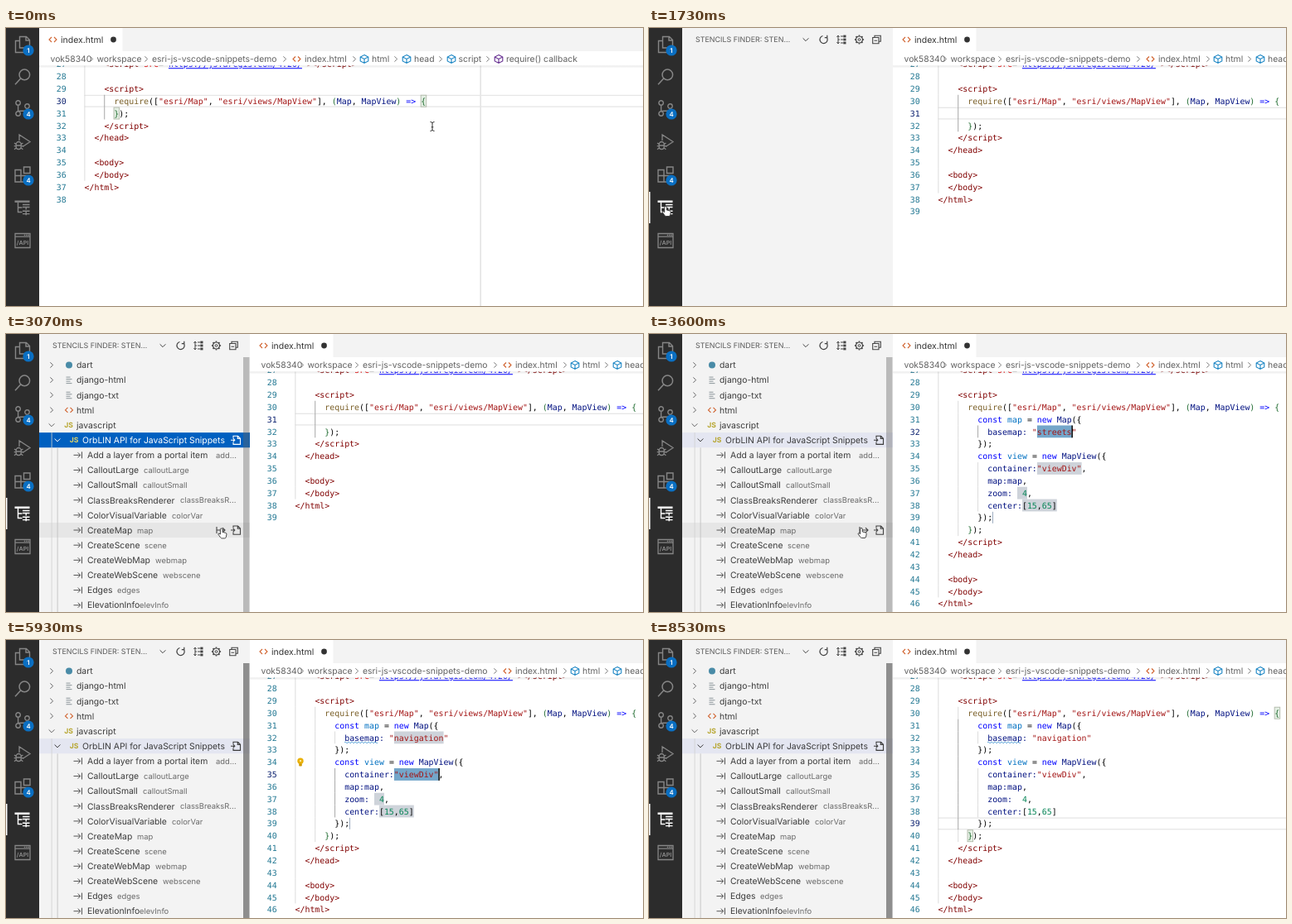
An HTML page that plays this animation: 768 by 336 pixels, repeating every 9.4 s.

```html
<!DOCTYPE html>
<html lang="en">
<head>
<meta charset="utf-8">
<title>Editor snippets demo</title>
<style>
html, body { margin: 0; width: 100%; height: 100%; overflow: hidden; background: #fff; }
svg { display: block; width: 768px; height: 336px; }
text { white-space: pre; text-rendering: geometricPrecision; font-family: Inter, "Liberation Sans", sans-serif; }
.code { font: 9.917px "DejaVu Sans Mono", "Liberation Mono", monospace; }
</style>
</head>
<body>
<svg id="stage" viewBox="0 0 768 336" xmlns="http://www.w3.org/2000/svg"></svg>
<script>
const LOOP = 9400, CH = 5.97, LH = 14.85, ROW = 18.14, SIDE = 254;
const stage = document.getElementById("stage");

const X = col => 94.5 + col * CH;
const Y = line => 58.5 + (line - 28) * LH;
const esc = s => s.replace(/&/g, "&amp;").replace(/</g, "&lt;").replace(/>/g, "&gt;");
const rect = (x, y, w, h, fill, more = "") =>
  `<rect x="${x}" y="${y}" width="${w}" height="${h}" fill="${fill}" ${more}/>`;
const line = (d, color, w = 1, more = "") =>
  `<path d="${d}" fill="none" stroke="${color}" stroke-width="${w}" ${more}/>`;
const dot = (x, y, r, fill) => `<circle cx="${x}" cy="${y}" r="${r}" fill="${fill}"/>`;
const at = (x, y, s) => `<g transform="translate(${x} ${y})">${s}</g>`;
// y is the middle of the line of text
const label = (x, y, s, fill = "#3b3b3b", size = 10.4, more = "") =>
  `<text x="${x}" y="${y + size * 0.36}" font-size="${size}" fill="${fill}" ${more}>${esc(s)}</text>`;

// ---- code ----
const COLORS = {
  t: "#800000", a: "#e50000", d: "#000", b: "#0000ff", u: "#0000ff", f: "#795e26",
  s: "#a31515", v: "#001080", c: "#0070c1", n: "#098658", g: "#1f6b2f"
};
const TOP = [
  [4, 't<script|a src|d=|b"|uhttps://js.arcgis.com/4.20/|b"|t><\/script>'],
  [4, ""],
  [4, "t<script>"],
  [6, 'frequire|d([|s"esri/Map"|d, |s"esri/views/MapView"|d], |g(|vMap|d, |vMapView|g)|b => |g{']
];
const END = [
  [6, "g}|d);"], [4, "t<\/script>"], [2, "t</head>"], [2, ""],
  [2, "t<body>"], [2, "t</body>"], [0, "t</html>"], [0, ""]
];
const snippet = word => [
  [8, "bconst |cmap |d= |bnew |vMap|d({"],
  [10, `vbasemap:|s "${word}"`],
  [8, "d});"],
  [8, "bconst |cview |d= |bnew |vMapView|d({"],
  [10, 'vcontainer:|s"viewDiv"|d,'],
  [10, "vmap:map|d,"],
  [10, "vzoom:|n  4|d,"],
  [10, "vcenter:|d[|n15|d,|n65|d]"],
  [8, "d});"]
];

function codeText(no, indent, src) {
  if (!src) return "";
  const spans = src.split("|").map(p =>
    `<tspan fill="${COLORS[p[0]]}"${p[0] === "u" ? ' text-decoration="underline"' : ""}>${esc(p.slice(1))}</tspan>`);
  return `<text class="code" x="${X(indent)}" y="${Y(no) + 3.6}">${spans.join("")}</text>`;
}

function wordAt(t) {
  if (t < 4530) return "streets";
  const n = t < 4600 ? 1 : t < 4870 ? 2 : Math.min(10, 3 + Math.floor((t - 4870) / 94.3));
  return "navigation".slice(0, n);
}

function editorState(t) {
  if (t < 470) return { lines: [...TOP, ...END], no: 30, col: 69, lit: true, caret: t >= 70, pair: 31, guide: [4, 30, 31] };
  if (t < 3470) return {
    lines: [...TOP, [8, ""], ...END], no: 31, col: 8, lit: true, caret: t < 970,
    pair: t < 1670 ? 32 : 0, guide: [4, 30, 32]
  };
  const word = wordAt(t);
  const lines = [...TOP, ...snippet(word), ...END];
  if (t >= 7000) return {
    lines, no: 39, col: 11, lit: true, pair: 40, guide: [4, 31, 39], squiggle: true,
    caret: t < 7530 || (t >= 8000 && t < 8530)
  };
  const stops = [[32, 20, word.length], [35, 20, 9], [37, 16, 2], [38, 17, 7]];
  const i = t < 5670 ? 0 : t < 6200 ? 1 : t < 6530 ? 2 : 3;
  const [no, col, len] = stops[i];
  const typed = i === 0 && t >= 4530;
  const bulbs = [[4670, 32], [5800, 34], [6330, 36], [6730, 37]];
  return {
    lines, stops, no, col: col + len, caret: true, lit: typed, selected: typed ? -1 : i,
    guide: i ? [8, 35, 38] : [8, 32, 32], squiggle: t >= 4670,
    bulb: t >= bulbs[i][0] ? bulbs[i][1] : 0
  };
}

const bracketBox = (no, col) => rect(X(col) - 0.3, Y(no) - 7, CH + 0.6, 14, "#e5f0e5", 'stroke="#b0b8a8" stroke-width=".9"');

function bulb(y) {
  return at(101, y, dot(0, -1.3, 3.7, "#e9b10a") + rect(-1.8, 1.6, 3.6, 3.4, "#d09a05", 'rx=".8"') + dot(0, -1.5, 1.1, "#fff0b8"));
}

function codeArea(t, open) {
  const s = editorState(t);
  let out = "";
  if (!open) out += rect(571.6, 45, 1, 291, "#d3d3d3");
  if (s.lit) {
    const y = Y(s.no);
    out += rect(X(0), y - 7.4, 680, 1.3, "#e6e6e6") + rect(X(0), y + 6.2, 680, 1.3, "#e6e6e6");
  }
  (s.stops || []).forEach(([no, col, len], i) => {
    out += rect(X(col), Y(no) - LH / 2, len * CH, LH, i === s.selected ? "#74a6ca" : "#ced3da");
  });
  if (s.stops) out += rect(X(11), Y(39) - 7, 0.8, 14, "#8598b1");
  if (s.pair) out += bracketBox(30, 68) + bracketBox(s.pair, 6);
  s.lines.forEach(([indent, src], i) => {
    const no = 27 + i, [gc, from, to] = s.guide;
    for (let c = 0; c < indent; c += 4) {
      const on = c === gc && no >= from && no <= to;
      out += rect(X(c), Y(no) - LH / 2, 0.8, LH, on ? "#939393" : "#d3d3d3");
    }
    out += `<text class="code" x="72.7" y="${Y(no) + 3.6}" text-anchor="end" fill="${no === s.no ? "#0b216f" : "#237893"}">${no}</text>`;
    out += codeText(no, indent, src);
  });
  if (s.squiggle) out += line(`M${X(10)} ${Y(32) + 6}` + "q1 -2 2 0t2 0".repeat(10), "#3a8fd0", 0.9);
  if (s.bulb) out += bulb(Y(s.bulb));
  if (s.caret) out += rect(X(s.col) - 0.3, Y(s.no) - LH / 2, 1.5, LH, "#000");
  return out;
}

// ---- tab and breadcrumbs ----
const angles = (x, y) => line(`M${x - 1.5} ${y - 3}l-3 3l3 3M${x + 1.5} ${y - 3}l3 3l-3 3`, "#d1632f", 1.1);
const chevron = (x, y, c = "#646465") => line(`M${x - 1.6} ${y - 3.2}l3.2 3.2l-3.2 3.2`, c, 1);
const chevronDown = (x, y, c = "#646465") => line(`M${x - 3.4} ${y - 1.7}l3.4 3.4l3.4 -3.4`, c, 1);
const cube = (x, y, c) => at(x, y, line("M0 -5L4.8 -2.5V2.5L0 5L-4.8 2.5V-2.5ZM-4.8 -2.5L0 0L4.8 -2.5M0 0V5", c, 1.1));

const CRUMBS = [
  [53.5, "vok58340", 103], [109.5, "workspace", 169], [176, "esri-js-vscode-snippets-demo", 336],
  [360, "index.html", 420], [441, "html", 470], [492, "head", 524], [545.5, "script", 581], [603, "require() callback"]
];
function editorTop() {
  let out = rect(40, 0, 800, 45.5, "#fff") + rect(140.5, 0, 700, 28, "#f3f3f3");
  out += `<rect x="40" y="45.5" width="760" height="3" fill="url(#shade)"/>`;
  out += angles(56.5, 14) + label(66, 14, "index.html", "#333", 10.5) + dot(129.5, 14, 3.4, "#333");
  for (const [x, s, sep] of CRUMBS) {
    out += label(x, 37.5, s, "#616161");
    if (sep) out += chevron(sep, 37.5, "#7a7a7a");
  }
  out += angles(350.5, 37.5);
  [432, 483, 537].forEach(x => out += cube(x, 37.5, "#1a85c4"));
  return out + cube(594, 37.5, "#652d90");
}

// ---- activity bar ----
const badge = n => dot(7, 7, 6.6, "#0a6fc2") + label(7, 7, n, "#fff", 7.8, 'text-anchor="middle" font-weight="600"');
const ICONS = [
  [20, c => line("M-3.5 -9.5h8l4 4v9.5h-12zM4 -9.5v4.5h4.5M-3.5 -4.5h-5v14h11v-5", c, 1.4), "1"],
  [59, c => line("M8.6 -2.6a6.3 6.3 0 1 1 -12.6 0a6.3 6.3 0 1 1 12.6 0M-2.3 2L-9 9.3", c, 1.5)],
  [97, c => line("M-2.7 -6.5a2.7 2.7 0 1 1 -5.4 0a2.7 2.7 0 1 1 5.4 0M-2.7 6.5a2.7 2.7 0 1 1 -5.4 0a2.7 2.7 0 1 1 5.4 0M8.2 -2.5a2.7 2.7 0 1 1 -5.4 0a2.7 2.7 0 1 1 5.4 0M-5.4 -3.8v7.6M5.5 .2q0 3 -4 3h-3.5q-3 0 -3.4 .8", c, 1.4), "4"],
  [138, c => line("M-4 -2V-9L9 -.5L0 5.5M-7.8 2.5a3 3 0 0 1 6 0v3a3 3 0 0 1 -6 0zM-7.8 4H-1.8M-10 1l2 1.5M.4 1l-2 1.5M-10.3 4.6h2.5M-1.8 4.6H.7M-10 8.8l2.4 -2M.4 8.8l-2.4 -2", c, 1.3)],
  [177, c => line("M-9 -5.5h7v7h7v7.5h-14zM-9 1.5h7v7.5M1.5 -9h7.5v7.5h-7.5z", c, 1.4), "4"],
  [217, c => rect(-9.5, -8.5, 18, 2.4, c) + line("M-5.5 -6v11.5h5M-5.5 0h5M0 -3.5h8.5M0 -.5h8.5M4.2 -.5v3M0 4.2h8.5M0 7.6h8.5M4.2 4.2v5", c, 1.4)],
  [257, c => line("M-9 -8.5h18v17h-18zM-9 -4.8h18", c, 1.3) + dot(2.5, -6.6, 0.8, c) + dot(4.8, -6.6, 0.8, c) + dot(7, -6.6, 0.8, c) +
    label(0, 2, "/API", c, 7, 'text-anchor="middle" font-weight="700"')]
];
function activityBar(mouse, open) {
  let out = rect(0, 0, 40, 336, "#2c2c2c");
  ICONS.forEach(([y, draw, n], i) => {
    const hot = mouse && mouse.x < 40 && Math.abs(mouse.y - y) < 19.8;
    const on = hot || (open && i === 5);
    out += at(20, y, draw(on ? "#fff" : "#868686") + (n ? badge(n) : ""));
  });
  if (open) out += rect(0, 198, 1.5, 38, "#fff");
  return out;
}

// ---- side bar ----
const ITEMS = [
  ["Add a layer from a portal item", "add...", 253], ["CalloutLarge", "calloutLarge", 166],
  ["CalloutSmall", "calloutSmall", 165], ["ClassBreaksRenderer", "classBreaksR...", 210],
  ["ColorVisualVariable", "colorVar", 200], ["CreateMap", "map", 158], ["CreateScene", "scene", 167],
  ["CreateWebMap", "webmap", 180], ["CreateWebScene", "webscene", 189], ["Edges", "edges", 134],
  ["ElevationInfo", "elevInfo", 161]
];
const LANGS = ["dart", "django-html", "django-txt", "html", "javascript"];
const insertIcon = (x, y, c) => line(`M${x - 5} ${y - 4}v8M${x - 5} ${y}h10M${x + 2} ${y - 3}l3 3l-3 3`, c, 1.1);
const itemIcon = (x, y) => line(`M${x - 5} ${y}h8M${x + 0.2} ${y - 3}l3 3l-3 3M${x + 5} ${y - 4}v8`, "#555", 1);
const fileIcon = (x, y, c) => at(x, y, line("M-3 -2.5V-5H2.5L5.5 -2V5.2H-3V2.5M2.3 -5v3.2h3.2M-6 0h4.5M-3.2 -2l2 2l-2 2", c, 1.1));
const js = (x, y, c) => label(x, y, "JS", c, 8.6, 'text-anchor="middle" font-weight="700"');

function sideHeader() {
  const c = "#424242";
  return label(56, 14, "STENCILS FINDER: STEN…", "#5a5a5a", 8.95) + chevronDown(189, 14, c) +
    at(210.5, 14, line("M3.9 -2.6A4.6 4.6 0 1 1 -1 -4.5M4.3 -5.3v3h-3", c, 1.2)) +
    at(232, 14, line("M-4 -4.5v9M-5.5 -3l1.5 -2l1.5 2M-5.5 3l1.5 2l1.5 -2M-1 -4h3M-1 0h3M-1 4h3M-4 0h2", c, 1) +
      [-4, 0, 4].map(y => rect(2.3, y - 1.4, 3.2, 2.8, c)).join("")) +
    at(253.5, 14, line("M4 0a4 4 0 1 1 -8 0a4 4 0 1 1 8 0", c, 1.2) + line("M1.4 0a1.4 1.4 0 1 1 -2.8 0a1.4 1.4 0 1 1 2.8 0", c, 1) +
      [0, 45, 90, 135].map(a => line("M0 -5.6v1.4M0 4.2v1.4", c, 1.7, `transform="rotate(${a})"`)).join("")) +
    at(274.5, 14, line("M-2.5 -2.5V-4.8H4.8V2.2H2.5M-4.8 -2.5H2.5V4.8H-4.8ZM-3 1.2h3.6", c, 1.1));
}

function sideBar(t, mouse) {
  let out = rect(40, 0, SIDE, 336, "#f3f3f3") + sideHeader();
  if (t < 1740) return out;
  const focus = t < 3470, ink = focus ? "#fff" : "#3b3b3b";
  const hover = mouse.x >= 40 && mouse.x < 286 ? Math.floor((mouse.y - 28.4) / ROW) : -1;
  const mid = i => 37.5 + i * ROW;
  const band = (i, fill) => rect(40, mid(i) - ROW / 2, SIDE, ROW, fill);
  if (hover >= 0 && hover !== 5) out += band(hover, "#e6e6e6");
  out += band(5, focus ? "#0060c0" : "#e4e6f1");
  out += rect(54.7, mid(5) - ROW / 2, 0.8, 240, "#cfcfcf") + rect(61.7, mid(6) - ROW / 2, 0.8, 240, "#bdbdbd");
  LANGS.forEach((s, i) => {
    const y = mid(i);
    out += (i < 4 ? chevron : chevronDown)(55, y) + label(85, y, s);
    if (i === 0) out += dot(76, y, 4, "#498ba7");
    else if (i < 3) out += line(`M72.5 ${y - 3.5}h5M72.5 ${y - 1}h7M72.5 ${y + 1.5}h5M72.5 ${y + 4}h7`, "#8a9499", 1);
    else if (i === 3) out += angles(76, y);
    else out += js(75.5, y, "#b7a62f");
  });
  out += chevronDown(62, mid(5), ink) + js(82, mid(5), focus ? "#e0d56a" : "#b7a62f") +
    label(92, mid(5), "OrbLIN API for JavaScript Snippets", ink) + fileIcon(277, mid(5), ink);
  ITEMS.forEach(([name, key, x], i) => {
    const y = mid(i + 6), hot = hover === i + 6;
    out += itemIcon(86.5, y) + label(98, y, name);
    out += label(x, y + 0.3, key, "#6a6a6a", 9.4);
    if (hot) out += insertIcon(259, y, "#424242") + fileIcon(277, y, "#424242");
  });
  // the scroll bar darkens under the pointer
  return out + rect(286, 28, 7.5, 308, "#646464", `opacity="${mouse.x >= 286 ? 0.7 : 0.4}"`);
}

// ---- pointer ----
const PATH = [
  [470, 514, 119], [1200, 5, 238], [1400, 5, 238], [1600, 20, 216], [2000, 20, 216], [2200, 85, 57],
  [2400, 161, 225], [2950, 254, 234], [3130, 262, 236], [3330, 256, 235], [3730, 256, 235], [4200, 289, 322]
];
function pointerAt(t) {
  const tick = Math.floor((t + 4) * 0.015) / 0.015;
  const k = PATH.findIndex(p => p[0] > tick);
  const [t1, x1, y1] = PATH[k < 0 ? PATH.length - 1 : k];
  if (k <= 0) return { x: x1, y: y1 };
  const [t0, x0, y0] = PATH[k - 1];
  const u = (tick - t0) / (t1 - t0), e = u * u * (3 - 2 * u);
  return { x: x0 + (x1 - x0) * e, y: y0 + (y1 - y0) * e };
}
const HAND = "M-1.3 .8a1.3 1.3 0 0 1 2.6 0V4l3.8 .9q1.3 .4 1.1 1.8l-.6 3.2q-.3 1.6 -1.6 1.6h-3.4q-1 0 -1.7 -1l-2.7 -3.7q-.3 -1.3 1 -1.1l1.5 .9z";
const BEAM = "M-2.5 -5.5q2.5 0 2.5 1.5q0 -1.5 2.5 -1.5M0 -4V4M-2.5 5.5q2.5 0 2.5 -1.5q0 1.5 2.5 1.5M-1.3 .8h2.6";
const pointer = (m, open) => at(m.x, m.y, m.x < (open ? 294 : 40)
  ? `<path d="${HAND}" fill="#fff" stroke="#333" stroke-width=".9"/>`
  : line(BEAM, "#fff", 2.2) + line(BEAM, "#333", 1));

const tip = o => `<g opacity="${o}">` + rect(42, 245.5, 56, 21, "#f0f0f0", 'stroke="#ddd" stroke-width=".8"') +
  line("M42 253l-3 3l3 3", "#bbb", 0.9) + label(50, 256, "OpenAPI", "#777", 10) + "</g>";

function picture(t) {
  const open = t >= 1670, mouse = pointerAt(t);
  return `<defs><linearGradient id="shade" x2="0" y2="1"><stop stop-color="#000" stop-opacity=".09"/><stop offset="1" stop-color="#000" stop-opacity="0"/></linearGradient></defs>` +
    rect(0, 0, 768, 336, "#fff") + at(open ? SIDE : 0, 0, codeArea(t, open) + editorTop()) +
    (open ? sideBar(t, mouse) : "") + activityBar(mouse, open) +
    (t >= 1260 && t < 1470 ? tip(t < 1330 ? 0.6 : 1) : "") +
    (t < 4530 ? pointer(mouse, open) : "");
}

const start = performance.now();
let last = "";
function tick() {
  const next = picture((performance.now() - start) % LOOP);
  if (next !== last) stage.innerHTML = last = next;
  requestAnimationFrame(tick);
}
tick();
</script>
</body>
</html>
```
